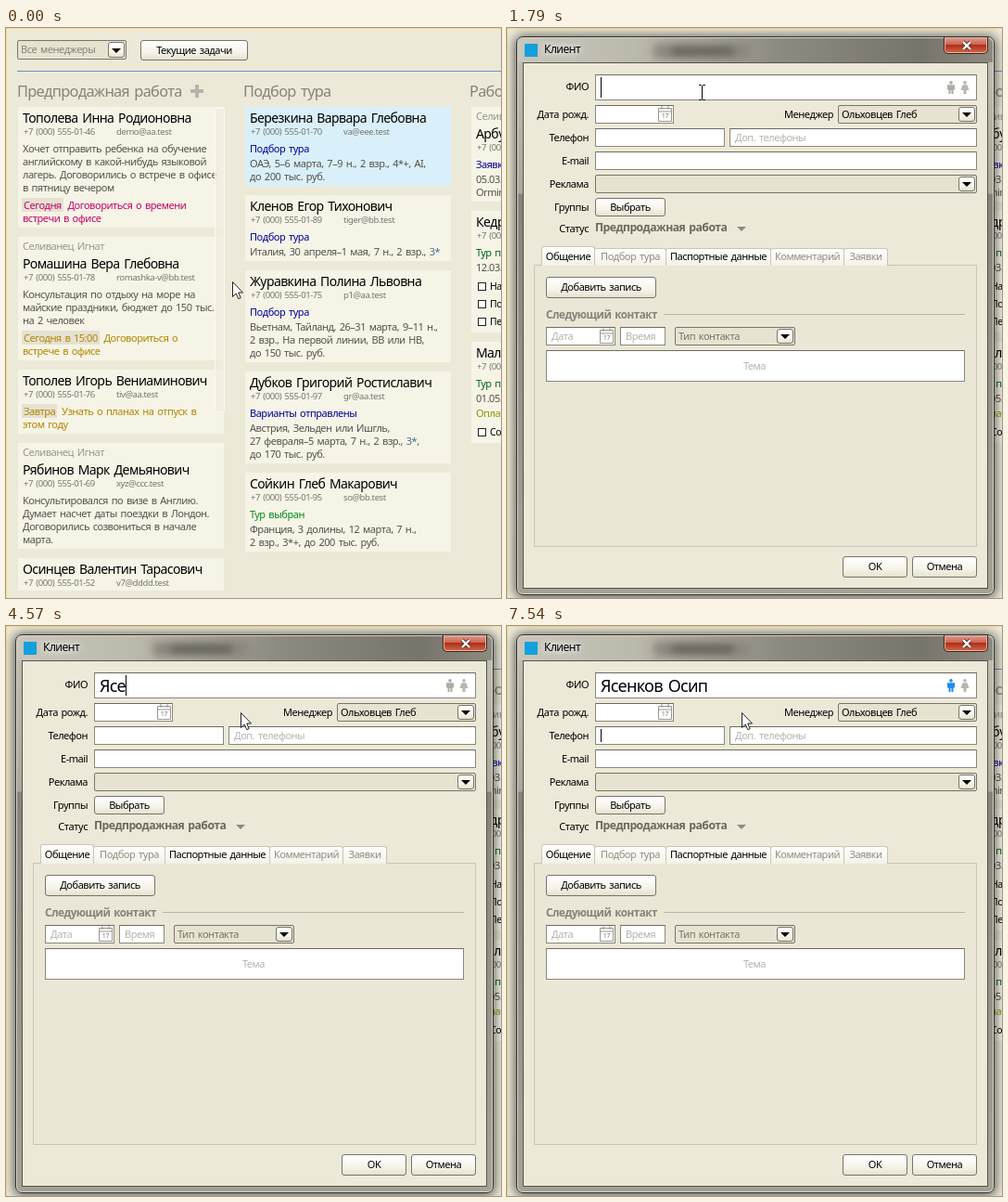
An HTML page for the animation above (8000 ms loop, 534 by 614 pixels).

```html
<!DOCTYPE html>
<html lang="ru">
<head>
<meta charset="utf-8">
<style>
html, body { margin: 0; width: 100%; height: 100%; overflow: hidden; }
body { position: relative; background: #ece9d8; font-family: "Noto Sans", "Open Sans", sans-serif; }
#board, #dialog { position: absolute; inset: 0; overflow: hidden; }
div, p, svg { position: absolute; box-sizing: border-box; margin: 0; }
p { white-space: pre; line-height: 14px; letter-spacing: -.043em; word-spacing: .12em; }
mark { background: #e5e2d2; color: inherit; padding: 0 2px; margin: 0 1px 0 -1px; }
i { font-style: normal; color: #4a6a94; }
svg { overflow: visible; }
</style>
</head>
<body>
<div id="board"></div>
<div id="dialog"></div>
<div id="caret" style="width:1px;background:#000"></div>
<svg id="cursor" width="1" height="1"></svg>
<script>
const $ = id => document.getElementById(id);

// y is the baseline of the first line
const text = (x, y, s, size = 11, color = '#000', css = '') =>
  `<p style="left:${x}px;top:${y - 7 - .388 * size}px;font-size:${size}px;color:${color};${css}">${s}</p>`;
const box = (x, y, x2, y2, bg, css = '') =>
  `<div style="left:${x}px;top:${y}px;width:${x2 - x}px;height:${y2 - y}px;background:${bg};${css}"></div>`;
const icon = (x, y, d, css, id = '') =>
  `<svg style="left:${x}px;top:${y}px" width="1" height="1"><path id="${id}" d="${d}" style="${css}"/></svg>`;
const RIGHT = 'transform:translateX(-100%);', CENTER = 'transform:translateX(-50%);';
const GRAY = '#86837a', HINT = '#b4b3ae', BODY = '#55524c', NAVY = '#00009c';

const field = (x, y, x2, y2, hint = '', bg = '#fff') =>
  box(x, y, x2, y2, bg, 'border:1px solid #8a877b;border-top-color:#6e6b61') + text(x + 6, y + 14, hint, 11, HINT);
const button = (x, y, x2, y2, s) =>
  box(x, y, x2, y2, 'linear-gradient(#fff,#f6f4ea 60%,#e6e2d0)', 'border:1px solid #77746a;border-radius:3px') +
  text((x + x2) / 2, (y + y2) / 2 + 4, s, 11, '#000', CENTER);
const combo = (x, y, x2, y2, s, color) =>
  box(x, y, x2, y2, '#e7e3d1', 'border:1px solid #77746a;border-radius:2px') +
  text(x + 4, (y + y2) / 2 + 4, s, 11, color) +
  button(x2 - 20, y + 2, x2 - 2, y2 - 2, '') +
  icon(x2 - 16, (y + y2) / 2 - 2, 'M0 0H10L5 5Z', 'fill:#000');
const calendar = (x, y) =>
  icon(x, y, 'M.5 2.5H14.5V16.5H.5ZM.5 6H14.5M4 0V4M11 0V4', 'fill:#fff;stroke:#99968c') +
  text(x + 7.5, y + 14, '17', 7, '#77746a', CENTER);

// rows: [text, colour, distance to the next row]
function card(x, y, h, manager, name, phone, mail, rows, bg = '#f6f4e6') {
  let out = box(x, y, x + 222, y + h, bg);
  if (manager) { out += text(x + 5, y + 14, manager, 11, '#99968d'); y += 17; }
  out += text(x + 5, y + 17, name, 14) +
    text(x + 6, y + 31, phone, 9.5, '#77746e') + text(x + 106, y + 31, mail, 9.5, '#77746e');
  y += 49;
  for (const [s, color = BODY, gap = 16] of rows) {
    out += text(x + 5, y, s, 11, color);
    y += 14 * (s.split('\n').length - 1) + gap;
  }
  return out;
}
const check = (y, s) => box(509, y - 4, 518, y + 5, '#fff', 'border:1px solid #222') + text(522, y + 4, s, 10.5);
const tel = tail => '+7 (000) 555-' + tail;
const BOSS = 'Селиванец Игнат', OCHRE = '#b08600', GREEN = '#008a1c';

$('board').innerHTML =
  box(0, 0, 534, 1, '#f5dc8c') + box(0, 0, 1, 614, '#f5dc8c') +
  combo(12, 13, 130, 34, 'Все менеджеры', '#86837a') +
  button(145, 13, 261, 35, 'Текущие задачи') +
  box(12, 46, 534, 47, '#6c92c0') +
  text(12, 74, 'Предпродажная работа', 16.3, GRAY) +
  text(256, 74, 'Подбор тура', 16.3, GRAY) +
  text(500, 74, 'Работа', 16.3, GRAY) +
  icon(206, 68, 'M-7 0H7M0-7V7', 'stroke:#b6b4ad;stroke-width:4') +

  card(13, 85, 130, '', 'Тополева Инна Родионовна', tel('01-46'), 'demo@aa.test', [
    ['Хочет отправить ребенка на обучение\nанглийскому в какой-нибудь языковой\nлагерь. Договорились о встрече в офисе\nв пятницу вечером', BODY, 19],
    ['<mark>Сегодня</mark> Договориться о времени\nвстречи в офисе', '#c80064']]) +
  card(13, 225, 133, BOSS, 'Ромашина Вера Глебовна', tel('01-78'), 'romashka-v@bb.test', [
    ['Консультация по отдыху на море на\nмайские праздники, бюджет до 150 тыс.\nна 2 человек', BODY, 19],
    ['<mark>Сегодня в 15:00</mark> Договориться о\nвстрече в офисе', OCHRE]]) +
  card(13, 368, 69, '', 'Тополев Игорь Вениаминович', tel('01-76'), 'tiv@aa.test', [
    ['<mark>Завтра</mark> Узнать о планах на отпуск в\nэтом году', OCHRE]]) +
  card(13, 447, 114, BOSS, 'Рябинов Марк Демьянович', tel('01-69'), 'xyz@ccc.test', [
    ['Консультировался по визе в Англию.\nДумает насчет даты поездки в Лондон.\nДоговорились созвониться в начале\nмарта.']]) +
  card(13, 571, 35, '', 'Осинцев Валентин Тарасович', tel('01-52'), 'v7@dddd.test', []) +
  box(225, 86, 236, 414, 'rgba(241,238,224,.7)', 'border:1px solid #fbf9f0') +

  card(258, 85, 85, '', 'Березкина Варвара Глебовна', tel('01-70'), 'va@eee.test', [
    ['Подбор тура', NAVY], ['ОАЭ, 5–6 марта, 7–9 н., 2 взр., 4*+, AI,\nдо 200 тыс. руб.']], '#d9f0fa') +
  card(258, 180, 71, '', 'Кленов Егор Тихонович', tel('01-89'), 'tiger@bb.test', [
    ['Подбор тура', NAVY], ['Италия, 30 апреля–1 мая, 7 н., 2 взр., <i>3*</i>']]) +
  card(258, 261, 99, '', 'Журавкина Полина Львовна', tel('01-75'), 'p1@aa.test', [
    ['Подбор тура', NAVY], ['Вьетнам, Тайланд, 26–31 марта, 9–11 н.,\n2 взр., На первой линии, BB или HB,\nдо 150 тыс. руб.']]) +
  card(258, 370, 99, '', 'Дубков Григорий Ростиславич', tel('01-97'), 'gr@aa.test', [
    ['Варианты отправлены', NAVY], ['Австрия, Зельден или Ишгль,\n27 февраля–5 марта, 7 н., 2 взр., <i>3*</i>,\nдо 170 тыс. руб.']]) +
  card(258, 479, 85, '', 'Сойкин Глеб Макарович', tel('01-95'), 'so@bb.test', [
    ['Тур выбран', GREEN], ['Франция, 3 долины, 12 марта, 7 н.,\n2 взр., 3*+, до 200 тыс. руб.']]) +

  card(502, 85, 102, BOSS, 'Арбузкин', tel('01-11'), '', [['Заявка', NAVY], ['05.03.\nOrmina']]) +
  card(502, 197, 131, '', 'Кедрина', tel('01-12'), '', [['Тур подтвержден', '#006414'], ['12.03.']]) +
  check(278, 'Напомнить') + check(297, 'Позвонить') + check(316, 'Передать') +
  card(502, 338, 109, '', 'Малинкин', tel('01-13'), '', [
    ['Тур подтвержден', '#006414'], ['01.05.'], ['Оплачен', '#8c9600']]) +
  check(435, 'Сообщить');

const label = (y, s) => text(88, y, s, 11, '#000', RIGHT);
const tab = (x, x2, s, color, top = 237) =>
  box(x, top, x2, 256, 'linear-gradient(#fff,#f4f2e7)', 'border:1px solid #c9c6b6;border-bottom:0;border-radius:3px 3px 0 0') +
  text((x + x2) / 2, 250, s, 11, color, CENTER);
const man = 'M0-7a1.8 1.8 0 1 1-.01 0M-4-2.8H4V2.500H2.500V7H.5V3H-.5V7H-2.500V2.500H-4Z';
const woman = 'M0-7a1.8 1.8 0 1 1-.01 0M-2.500-2.800H2.500L4.500 3H1.500V7H-1.500V3H-4.500Z';

$('dialog').innerHTML =
  box(10, 9, 526, 611, 'linear-gradient(#c3c0b4,#aaa79b 28%,#86837a 28.2%,#a5a296)',
    'border:1px solid #33322e;border-radius:7px;box-shadow:0 1px 12px 2px rgba(0,0,0,.6),inset 0 0 0 1px #d8d6cb') +
  box(12, 11, 524, 37, 'linear-gradient(90deg,#c9c6bb,#bbb8ac 25%,#8d8a80 55%,#77746b 85%,#8d8a80)', 'border-radius:6px 6px 0 0') +
  box(158, 17, 262, 33, '#8a877c', 'border-radius:6px;filter:blur(4px)') +
  box(178, 22, 244, 28, '#57554d', 'filter:blur(4px)') +
  box(19, 17, 33, 31, '#14a0dc') +
  text(40, 28, 'Клиент', 12, '#000', 'text-shadow:0 0 8px #fff,0 0 8px #fff;') +
  box(471, 10, 519, 28, 'linear-gradient(#dda193,#c9604c 48%,#b02f18 50%,#cf6a45)',
    'border:1px solid #4a201a;border-top:0;border-radius:0 0 5px 5px;box-shadow:inset 0 0 0 1px #e4b4a8') +
  icon(496, 19, 'M-4-4L4 4M4-4L-4 4', 'stroke:#5d2c25;stroke-width:4') +
  icon(496, 19, 'M-4-4L4 4M4-4L-4 4', 'stroke:#fff;stroke-width:2.4') +
  box(17, 37, 519, 604, '#ece9d8', 'border:1px solid #55534c') +

  label(67, 'ФИО') + field(95, 50, 507, 78) +
  icon(479, 64, man, 'fill:#aeaca5', 'man') + icon(494, 64, woman, 'fill:#b8b6af') +
  text(101, 71, '<span id="name"></span>', 18) +
  label(97, 'Дата рожд.') + field(95, 83, 180, 103) + calendar(163, 84) +
  text(352, 97, 'Менеджер', 11, '#000', RIGHT) + combo(357, 83, 507, 103, 'Ольховцев Глеб') +
  label(122, 'Телефон') + field(95, 108, 235, 128) + field(240, 108, 507, 128, 'Доп. телефоны') +
  label(147, 'E-mail') + field(95, 133, 507, 153) +
  label(172, 'Реклама') + combo(95, 158, 507, 178, '') +
  label(197, 'Группы') + button(95, 183, 171, 203, 'Выбрать') +
  label(220, 'Статус') + text(95, 220, 'Предпродажная работа', 12.2, '#6b685c', 'font-weight:700;') +
  icon(248, 214, 'M0 0H10L5 5Z', 'fill:#8d8a80') +

  box(29, 255, 507, 559, '#eae7d6', 'border:1px solid #c9c6b6') +
  tab(94, 172, 'Подбор тура', '#8f8c84') + tab(171, 285, 'Паспортные данные', '#000') +
  tab(284, 364, 'Комментарий', '#8f8c84') + tab(363, 411, 'Заявки', '#8f8c84') +
  tab(37, 95, 'Общение', '#000', 235) +
  button(42, 268, 161, 291, 'Добавить запись') +
  text(42, 313, 'Следующий контакт', 11.7, '#86837a', 'font-weight:700;') +
  box(169, 308, 494, 309, '#b9b6a8') +
  field(42, 322, 117, 342, 'Дата') + calendar(100, 323) + field(122, 322, 171, 342, 'Время') +
  combo(181, 322, 311, 342, 'Тип контакта', '#77746a') +
  field(42, 347, 494, 381) + text(267, 368, 'Тема', 11, HINT, CENTER) +
  button(362, 569, 432, 592, 'OK') + button(437, 569, 507, 592, 'Отмена');

const shapes = {
  arrow: '<path d="M.5.5V16.5L4.2 13L6.8 18.7L9.2 17.6L6.7 12H11.5Z" fill="#fff" stroke="#222"/>',
  hand: '<path d="M4.5 13V2.5Q6-.5 7.5 2.5V8Q9 6.5 10.5 8.5Q12 7.5 13 9.5Q15 8.5 15.5 11V15Q15.5 18 13.5 19V22.5H6.5V20L1.5 14Q.5 11 2.5 11Z" fill="#fff" stroke="#000" stroke-width="1.2"/><path d="M7.5 8V12M10.5 9V12M13 10V13" stroke="#000"/>',
  beam: '<path d="M0 .5H2.5L3.5 1.5L4.5.5H7M3.5 1.5V15.5M0 16.5H2.5L3.5 15.5L4.5 16.5H7" fill="none" stroke="#000"/>'
};
// time, shape, left, top
const pointer = [
  [0, 'arrow', 244, 273], [460, 'arrow', 243, 270], [600, 'arrow', 245, 213], [730, 'arrow', 235, 146],
  [880, 'arrow', 226, 112], [1000, 'arrow', 215, 92], [1130, 'arrow', 208, 80],
  [1280, 'hand', 203, 69], [1420, 'hand', 203, 68], [1540, 'hand', 203, 67],
  [1790, 'beam', 207, 61], [2060, 'beam', 224, 65], [2200, 'beam', 233, 65], [2330, 'beam', 236, 65],
  [2600, 'arrow', 250, 85], [2730, 'arrow', 253, 93]
];
const NAME = 'Ясенков Осип';
const keys = [3910, 4190, 4570, 4690, 4830, 4950, 5070, 5220, 5520, 5830, 5830, 6680];
const blinks = [1790, 2200, 2600, 3190, 3770, 6370, 6680];  // on, off, on, ...
const OPEN = 1790, TO_DATE = 7110, TO_PHONE = 7540;
const count = (times, t) => times.filter(v => v <= t).length;

function draw(t) {
  $('dialog').style.display = t < OPEN ? 'none' : '';
  $('name').textContent = NAME.slice(0, count(keys, t));
  $('man').style.fill = t < TO_DATE ? '#aeaca5' : '#1e8cf0';

  let x = 101, y = 53, h = 22;
  if (t >= TO_PHONE) [y, h] = [111, 14];
  else if (t >= TO_DATE) [y, h] = [86, 14];
  else x += $('name').offsetWidth;
  const on = t >= TO_DATE || count(blinks, t) % 2;
  Object.assign($('caret').style, { left: x + 'px', top: y + 'px', height: h + 'px', opacity: on ? 1 : 0 });

  const [, shape, left, top] = pointer.findLast(p => p[0] <= t);
  $('cursor').innerHTML = shapes[shape];
  Object.assign($('cursor').style, { left: left + 'px', top: top + 'px' });
}

const start = performance.now();
(function tick() {
  draw((performance.now() - start) % 8000);
  requestAnimationFrame(tick);
})();
</script>
</body>
</html>
```
